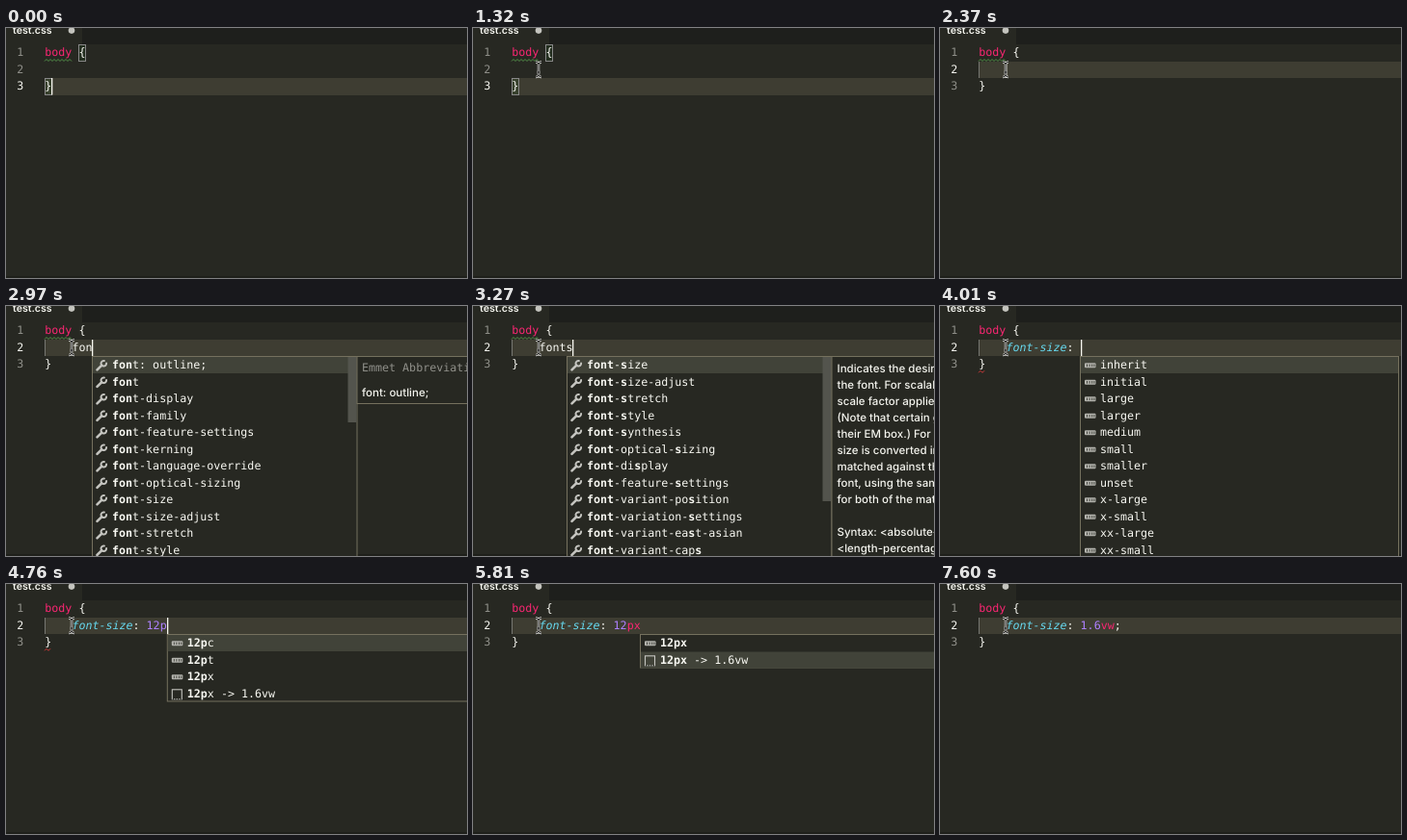
Write an HTML page that moves like this. It is 478 px wide and 260 px high and loops after 8000 ms.

```html
<!DOCTYPE html>
<html lang="en">
<head>
<meta charset="utf-8">
<title>Editor completion</title>
<style>
html, body { margin: 0; width: 100%; height: 100%; overflow: hidden; background: #272822; }
svg { display: block; width: 100vw; height: 100vh; }
text { white-space: pre; text-rendering: geometricPrecision; }
.code { font: 11.66px "DejaVu Sans Mono", monospace; fill: #f8f8f2; }
.code .b { font-weight: bold; }
.code .prop { fill: #66d9ef; font-style: italic; }
.code .num { fill: #ae81ff; }
.code .tag { fill: #f92672; }
.code .dim { fill: #90908a; }
.ui { font: 500 11.5px Inter, "Open Sans", sans-serif; fill: #f4f4ee; }
</style>
</head>
<body>
<svg id="stage" viewBox="0 0 478 260" preserveAspectRatio="none"></svg>
<script>
const LOOP = 8000, ROW = 17.5, CHAR = 7.02, LEFT = 40.3, INDENT = LEFT + 4 * CHAR;
const stage = document.getElementById('stage');

const esc = s => s.replace(/&/g, '&amp;').replace(/</g, '&lt;').replace(/>/g, '&gt;');
const span = (cls, s) => `<tspan class="${cls}">${esc(s)}</tspan>`;
const rect = (x, y, w, h, fill, extra = '') =>
  `<rect x="${x}" y="${y}" width="${w}" height="${h}" fill="${fill}" ${extra}/>`;
const text = (cls, x, y, body, extra = '') => `<text class="${cls}" x="${x}" y="${y}" ${extra}>${body}</text>`;
const line = d => `<path d="${d}" fill="none" `;
const last = (list, t) => list.reduce((hit, e) => e[0] <= t ? e : hit, null);

const FONT = ['font: outline;', 'font', 'font-display', 'font-family', 'font-feature-settings',
  'font-kerning', 'font-language-override', 'font-optical-sizing', 'font-size',
  'font-size-adjust', 'font-stretch', 'font-style'];
const FONTS = ['font-size', 'font-size-adjust', 'font-stretch', 'font-style', 'font-synthesis',
  'font-optical-sizing', 'font-display', 'font-feature-settings', 'font-variant-position',
  'font-variation-settings', 'font-variant-east-asian', 'font-variant-caps'];
const FONTSI = ['font-size', 'font-size-adjust', 'font-optical-sizing', 'font-display',
  'font-synthesis', 'font-feature-settings', 'font-variant-position', 'font-variation-settings',
  'font-variant-east-asian', 'font-variant-caps', 'font-variant-ligatures', 'font-variant-alternates'];
const SIZES = ['inherit', 'initial', 'large', 'larger', 'medium', 'small', 'smaller', 'unset',
  'x-large', 'x-small', 'xx-large', 'xx-small'];
const UNITS = ['12pc', '12pt', '12px', '12px -> 1.6vw'];

const ABOUT = ['Indicates the desired height of glyphs from', 'the font. For scalable fonts, the font-size is a',
  'scale factor applied to the EM unit of the font.', '(Note that certain glyphs may bleed outside',
  'their EM box.) For non-scalable fonts, the font-', 'size is converted into absolute units and',
  'matched against the declared font-size of the', 'font, using the same absolute coordinate space',
  'for both of the matched values.', '', 'Syntax: <absolute-size> | <relative-size> |', '<length-percentage>'];

const menus = {
  fon: { x: 89.5, items: FONT, keys: [['fon']], thumb: 68, docs: 'emmet' },
  font: { x: 97.5, items: FONT, keys: [['font']], thumb: 68, docs: 'emmet' },
  fonts: { x: 97.5, items: FONTS, keys: [['font', 's']], thumb: 150, docs: 'size' },
  fontsi: { x: 97.5, items: FONTSI, keys: [['font', 'si'], ['font', 's', 'i'], ['font', 'i', 's']], thumb: 184, docs: 'size' },
  sizes: { x: 145.5, items: SIZES, keys: [], value: true },
  units: { x: 167.3, items: UNITS, keys: [['12p']], value: true },
  px: { x: 173.5, items: UNITS.slice(2), keys: [['12px']], value: true },
  vw: { x: 173.5, items: UNITS.slice(2), keys: [['12px']], value: true, pick: 1 }
};

// time, typed text, open menu
const typing = [
  [0, ''], [2670, 'f'], [2820, 'fo'], [2970, 'fon', 'fon'], [3120, 'font', 'font'],
  [3270, 'fonts', 'fonts'], [3420, 'fontsi', 'fontsi'], [4010, 'font-size: ', 'sizes'],
  [4460, 'font-size: 1'], [4610, 'font-size: 12'], [4760, 'font-size: 12p', 'units'],
  [5060, 'font-size: 12px', 'px'], [5810, 'font-size: 12px', 'vw'],
  [6250, 'font-size: 1.6vw'], [7150, 'font-size: 1.6vw;']
];
const pointer = [
  [150, 120, 93], [300, 102, 83], [440, 89, 75], [740, 82, 66],
  [890, 76, 56], [1030, 71, 48], [1180, 69, 44], [1320, 68, 43]
];
// caret flips at each of these times, starting lit
const blinks = [440, 890, 1320, 1470, 1920, 2370, 5510, 5960, 6700, 7150, 7600];
const CLICK = 1470;

function emphasize(name, keys) {
  for (const parts of keys) {
    let at = 0, out = '', ok = true;
    for (const p of parts) {
      const i = name.indexOf(p, at);
      if (i < 0) { ok = false; break; }
      out += esc(name.slice(at, i)) + span('b', p);
      at = i + p.length;
    }
    if (ok) return out + esc(name.slice(at));
  }
  return esc(name);
}

function colorize(s) {
  const m = s.match(/^(font-size)(: )([\d.]*p?(?!x))(\w*)(;?)$/);
  if (!m) return esc(s);
  return span('prop', m[1]) + m[2] + span('num', m[3]) + span('tag', m[4]) + m[5];
}

function squiggle(x, y, w, color) {
  let d = `M${x} ${y + 1}`;
  for (let i = 2; i <= w; i += 2) d += `L${x + i} ${y + (i % 4 ? -1 : 1)}`;
  return line(d) + `stroke="${color}" stroke-width=".9"/>`;
}

function wrench(x, y) {
  return `<g transform="translate(${x} ${y})" fill="none" stroke="#c5c5c0" stroke-linecap="round">` +
    line('M1.2 10.4L6 5.6') + 'stroke-width="2.6"/>' +
    line('M8.6 1A2.8 2.8 0 1 0 10.8 3.6') + 'stroke-width="2"/></g>';
}

function ruler(x, y) {
  return rect(x, y, 11.5, 5, '#b4b4ae', 'rx="1"') +
    [2, 4.6, 7.2, 9.4].map(i => rect(x + i, y + 1.2, 1, 2.6, '#45463f')).join('');
}

function snippet(x, y) {
  return rect(x, y, 10, 10, 'none', 'stroke="#c5c5c0" stroke-width="1.1"') +
    line(`M${x + .5} ${y + 10}h9.5`) + 'stroke="#272822" stroke-width="1.4" stroke-dasharray="1.2 1.4"/>';
}

function docs(kind, x) {
  const h = kind === 'emmet' ? 49 : 220;
  const box = rect(x, 52.5, 200, h, '#272822', 'stroke="#75715e"');
  if (kind === 'emmet')
    return box + text('code', x + 5, 67.8, span('dim', 'Emmet Abbreviation')) +
      text('ui', x + 5, 93.5, 'font: outline;');
  return box + ABOUT.map((s, i) => text('ui', x + 5.5, 69.2 + i * 17, esc(s))).join('');
}

function menu(m) {
  const w = m.docs ? 274.5 : 330, rows = m.items.length, pick = m.pick || 0;
  let out = rect(m.x, 52.5, w, rows * ROW - .5, '#272822', 'stroke="#75715e"');
  out += rect(m.x + .5, 53 + pick * ROW, w - 1, ROW - .5, '#414339');
  m.items.forEach((name, i) => {
    const y = 52.3 + i * ROW;
    out += !m.value ? wrench(m.x + 3.8, y + 3.7)
      : name.includes('->') ? snippet(m.x + 5, y + 5) : ruler(m.x + 4.5, y + 7);
    out += text('code', m.x + 20.5, y + 13.1, emphasize(name, m.keys));
  });
  if (m.thumb) out += rect(m.x + w - 9.5, 53, 9, m.thumb, '#53544d');
  return out + (m.docs ? docs(m.docs, m.x + w) : '');
}

function beam(x, y) {
  const d = `M${x - 3} ${y - 7.5}q2.6 0 3 1.8q.4-1.8 3-1.8M${x} ${y - 6}v13` +
    `M${x - 3} ${y + 8}q2.6 0 3-1.8q.4 1.8 3 1.8M${x - 1.6} ${y + 3}h3.2`;
  return line(d) + 'stroke="#e8e8e4" stroke-width="2.4"/>' + line(d) + 'stroke="#111" stroke-width="1"/>';
}

function scene(t) {
  const clicked = t >= CLICK, active = clicked ? 1 : 2;
  const [, typed, open] = last(typing, t);
  const lit = blinks.filter(b => b <= t).length % 2 === 0;
  const base = i => 29.2 + i * ROW;

  let out = rect(0, 0, 478, 260, '#272822') + rect(79, 0, 399, 17, '#1e1f1c') + rect(0, 258, 478, 2, '#1f201b');
  out += text('ui', 7, 6, 'test.css', 'style="font-size:10.6px;font-weight:600"');
  out += '<circle cx="68" cy="2.6" r="3.3" fill="#c4c4be"/>';
  out += rect(40, clicked ? 35 : 52, 438, clicked ? 17 : 18, '#3e3d32');
  if (clicked) out += rect(40, 35, 1, 17, '#767771');
  else out += [[75.5, 17.5], [40.5, 52.5]].map(([x, y]) =>
    rect(x, y, 7, 17, 'rgba(0,100,0,.1)', 'stroke="#888"')).join('');

  for (let i = 0; i < 3; i++)
    out += text('code', 11.3, base(i), i === active ? span('', String(i + 1)) : span('dim', String(i + 1)));
  out += text('code', LEFT, base(0), span('tag', 'body') + ' {');
  out += text('code', INDENT, base(1), colorize(typed));
  out += text('code', LEFT, base(2), '}');

  if (t < 3570) out += squiggle(40, 33.5, 28, '#5a9e4e');
  else if (t < 5510) out += squiggle(40, 68.3, 7, '#e03c3c');

  if (lit) out += clicked
    ? rect(Math.round(INDENT + typed.length * CHAR), 35, 1.3, 17, '#f8f8f0')
    : rect(47, 52, 1.3, 17.5, '#f8f8f0');
  if (open) out += menu(menus[open]);
  const p = last(pointer, t);
  return out + (p ? beam(p[1], p[2]) : '');
}

let shown = '';
function draw(now) {
  const next = scene(now % LOOP);
  if (next !== shown) stage.innerHTML = shown = next;
  requestAnimationFrame(draw);
}
draw(0);
</script>
</body>
</html>
```
